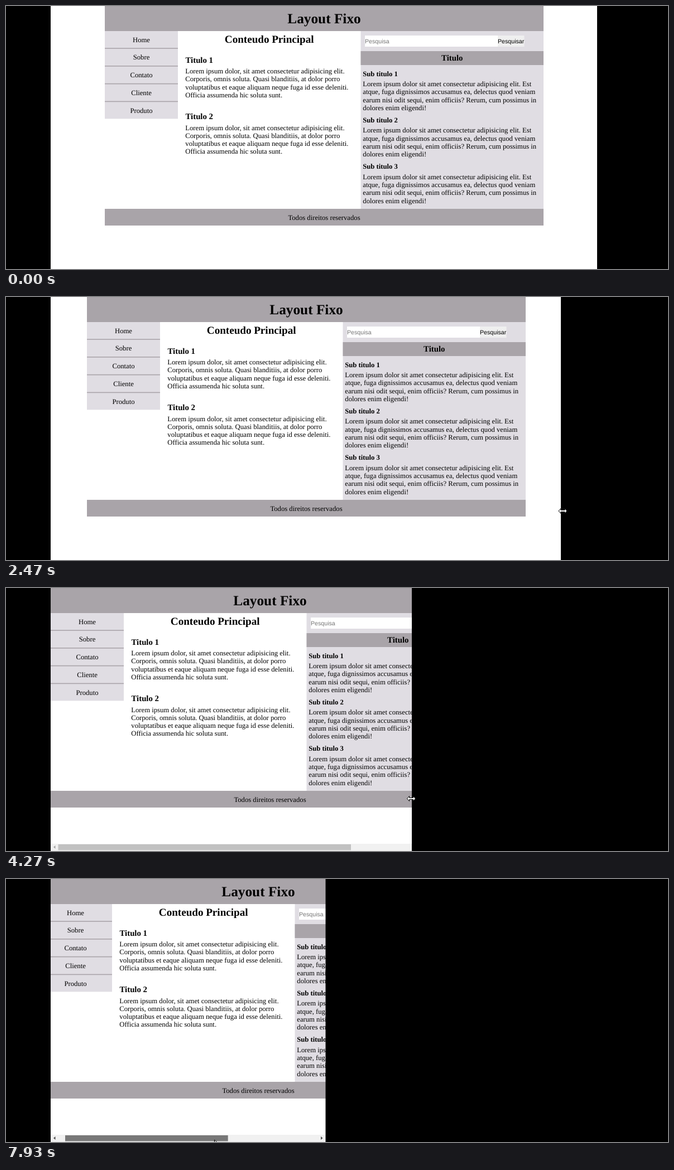
An HTML page that plays this animation: 1186 px wide and 472 px high, repeating every 8 s.

```html
<!DOCTYPE html>
<html lang="pt">
<head>
<meta charset="utf-8">
<title>Layout Fixo</title>
<style>
html, body { margin: 0; width: 100%; height: 100%; overflow: hidden; background: #000; }
svg { display: block; }
text { font: 12.66px "Liberation Serif", "Times New Roman", serif; text-rendering: geometricPrecision; }
.h1 { font-size: 25.3px; font-weight: bold; }
.h2 { font-size: 19.1px; font-weight: bold; }
.h3 { font-size: 14.8px; font-weight: bold; }
.h4 { font-weight: bold; }
.ui { font: 10.65px "Liberation Sans", Arial, sans-serif; }
.mid { text-anchor: middle; }
</style>
</head>
<body>
<svg id="stage" width="1186" height="472" viewBox="0 0 1186 472"></svg>
<script>
const LEFT = 80, PAGE = 786, DARK = '#a9a4a9', LIGHT = '#e0dde3';
const FRAME = 200 / 3, LOOP = 8000, WIDEST = 1059, NARROWEST = 572.5;
const stage = document.getElementById('stage');

function set(el, attrs) {
  for (const k in attrs) el.setAttribute(k, attrs[k]);
}
function add(parent, tag, attrs) {
  const el = document.createElementNS('http://www.w3.org/2000/svg', tag);
  set(el, attrs);
  return parent.appendChild(el);
}
const rect = (parent, x, y, width, height, fill) =>
  add(parent, 'rect', { x, y, width, height, fill });
const text = (x, y, str, cls = '', fill = '#000') => {
  add(page, 'text', { x, y, class: cls, fill }).textContent = str;
};
const lines = (x, y, list) => list.forEach((s, i) => text(x, y + i * 14.3, s));

rect(stage, LEFT, 0, 1106, 472, '#fff');
const page = add(stage, 'g', {});

// Header and footer
rect(page, 0, 0, PAGE, 45, DARK);
text(393, 31, 'Layout Fixo', 'h1 mid');
rect(page, 0, 364, PAGE, 30, DARK);
text(393, 383.5, 'Todos direitos reservados', 'mid');

// Menu
rect(page, 0, 45, 131, 157, DARK);
['Home', 'Sobre', 'Contato', 'Cliente', 'Produto'].forEach((s, i) => {
  const y = 45 + i * 31.8;
  rect(page, 0, y, 131, 30.2, LIGHT);
  text(65.5, y + 19.5, s, 'mid');
});

// Main column
text(294.7, 66, 'Conteudo Principal', 'h2 mid');
for (let i = 0; i < 2; i++) {
  const y = i * 101.5;
  text(144.5, 101.7 + y, 'Titulo ' + (i + 1), 'h3');
  lines(144.3, 121 + y, [
    'Lorem ipsum dolor, sit amet consectetur adipisicing elit.',
    'Corporis, omnis soluta. Quasi blanditiis, at dolor porro',
    'voluptatibus et eaque aliquam neque fuga id esse deleniti.',
    'Officia assumenda hic soluta sunt.'
  ]);
}

// Side column
rect(page, 458.5, 45, 327.5, 319, LIGHT);
rect(page, 466, 53, 238, 20, '#fff');
rect(page, 704, 53, 47.5, 20, '#efefef');
text(466, 66.6, 'Pesquisa', 'ui', '#757575');
text(704, 66.6, 'Pesquisar', 'ui');
rect(page, 458.5, 81, 327.5, 25, DARK);
text(622.3, 98.3, 'Titulo', 'h3 mid');
for (let i = 0; i < 3; i++) {
  const y = i * 83.3;
  text(462.3, 125.6 + y, 'Sub titulo ' + (i + 1), 'h4');
  lines(462.3, 144 + y, [
    'Lorem ipsum dolor sit amet consectetur adipisicing elit. Est',
    'atque, fuga dignissimos accusamus ea, delectus quod veniam',
    'earum nisi odit sequi, enim officiis? Rerum, cum possimus in',
    'dolores enim eligendi!'
  ]);
}

// Scrollbar
const bar = add(stage, 'g', {});
const track = rect(bar, LEFT, 459, 0, 13, '#f1f1f1');
const thumb = rect(bar, 0, 460, 0, 10.5, '#c1c1c1');
const back = add(bar, 'path', { d: 'M85 465l3.5-3v6z' });
const next = add(bar, 'path', { d: 'M2 465l-3.5-3v6z', fill: '#505050' });

// Dark surround
rect(stage, 0, 0, LEFT, 472, '#000');
const cover = rect(stage, 0, 0, 1186, 472, '#000');

const style = { fill: '#fff', stroke: '#000', 'stroke-width': 1 };
const arrow = add(stage, 'path', { ...style,
  d: 'M0 0V14.5L3.3 11.3L5.5 16.5L7.6 15.6L5.4 10.5H10Z' });
const sizer = add(stage, 'path', { ...style,
  d: 'M-7.5 0l4-4.5v3h7v-3l4 4.5l-4 4.5v-3h-7v3z' });

// Pointer path: time, x, y
const path = [
  [0, 1180, 480], [267, 1165, 466], [600, 1108, 425], [1067, 1065, 393],
  [1467, 1065, 393], [1533, 1061, 392], [2333, 1003, 385], [2467, 997.5, 384],
  [3000, 934, 378], [3133, 911, 377], [3200, 899, 377], [4067, 752, 378],
  [4267, 726, 378], [4933, 628, 377], [5500, 583, 376], [5667, 578, 376],
  [5800, 576, 376], [5867, 570, 367], [6133, 453, 338], [6200, 453, 338],
  [6467, 432, 320], [7067, 277, 430], [7467, 361, 468], [7600, 361, 468],
  [7933, 373.5, 468]
];
function pointer(t) {
  const i = path.findIndex(p => p[0] >= t);
  if (i < 0) return path[path.length - 1].slice(1);
  if (i === 0) return path[0].slice(1);
  const a = path[i - 1], b = path[i], k = (t - a[0]) / (b[0] - a[0]);
  return [a[1] + (b[1] - a[1]) * k, a[2] + (b[2] - a[2]) * k];
}
// The window edge trails the pointer, and the page layout trails the edge.
const edge = t => t < 1480 ? WIDEST : t > 5800 ? NARROWEST
  : Math.max(NARROWEST, Math.min(WIDEST, pointer(t - 50)[0] - 5.5));

function draw(now) {
  const t = Math.floor((now % LOOP + 4) / FRAME) % 120 * FRAME;
  const [x, y] = pointer(t);
  const right = edge(t - FRAME), view = right - LEFT;
  const drag = t > 7650 ? x - 361 : 0;
  const room = view - 27, scroll = drag * PAGE / room;

  const px = Math.max(LEFT, Math.round(LEFT + (view - PAGE) / 2)) - Math.round(scroll);
  set(page, { transform: `translate(${px})` });
  set(cover, { x: edge(t) });

  set(bar, { visibility: view < PAGE ? 'visible' : 'hidden' });
  set(track, { width: view });
  set(thumb, {
    x: LEFT + 13.5 + drag,
    width: Math.max(0, room * view / PAGE),
    fill: t > 7650 ? '#787878' : t > 7000 && y > 459 ? '#a8a8a8' : '#c1c1c1'
  });
  set(back, { fill: drag > 0 ? '#505050' : '#a3a3a3' });
  set(next, { transform: `translate(${right - 7})` });

  const sizing = t > 1000 && t < 5840;
  set(arrow, { transform: `translate(${x} ${y})`, visibility: t < 260 || sizing ? 'hidden' : 'visible' });
  set(sizer, { transform: `translate(${x} ${y})`, visibility: sizing ? 'visible' : 'hidden' });
}

let start;
function tick(now) {
  start ??= now;
  draw(now - start);
  requestAnimationFrame(tick);
}
draw(0);
requestAnimationFrame(tick);
</script>
</body>
</html>
```
